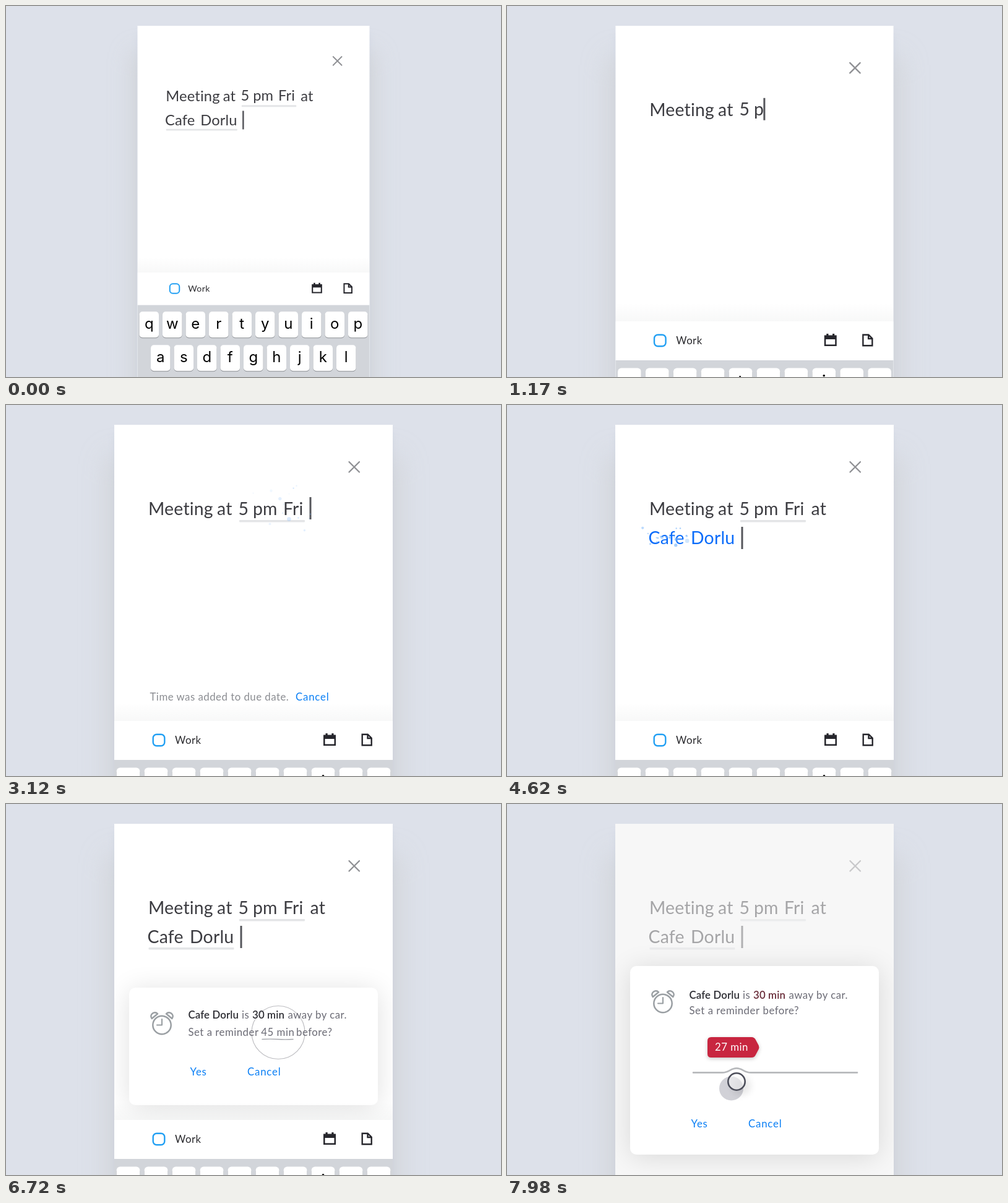
Animation of 800 by 600 pixels, one loop 8 s. Source, as an HTML page:

```html
<!DOCTYPE html>
<html lang="en">
<head>
<meta charset="utf-8">
<title>Smart task input</title>
<style>
  html, body { margin: 0; width: 100%; height: 100%; overflow: hidden; background: #dde1ea; }
  svg { display: block; width: 800px; height: 600px; }
  text { font-family: Lato, "Open Sans", sans-serif; font-size: 16.8px; letter-spacing: .5px; white-space: pre; }
  .big { font-size: 28.4px; letter-spacing: .2px; }
  .key { font-family: Inter, Roboto, sans-serif; font-size: 28.8px; letter-spacing: 0; text-anchor: middle; }
  .strong { font-weight: 600; letter-spacing: .15px; fill: #2d2d33; }
  .soft { fill: #6b6b75; }
  .link { letter-spacing: .8px; fill: #0a7ff5; }
  .line { fill: none; stroke-linecap: round; stroke-linejoin: round; }
</style>
</head>
<body>
<svg viewBox="0 0 800 600">
  <defs>
    <filter id="wide" filterUnits="userSpaceOnUse" x="0" y="0" width="800" height="1000"><feGaussianBlur stdDeviation="22"/></filter>
    <filter id="near" filterUnits="userSpaceOnUse" x="0" y="0" width="800" height="1000"><feGaussianBlur stdDeviation="6"/></filter>
    <filter id="small" x="-40%" y="-60%" width="180%" height="240%"><feDropShadow dx="0" dy="2" stdDeviation="3" flood-color="#000" flood-opacity=".22"/></filter>
    <clipPath id="clip"><rect x="175" y="32" width="450" height="700"/></clipPath>
    <linearGradient id="fade" x1="0" y1="0" x2="0" y2="1">
      <stop offset="0" stop-color="#30403c" stop-opacity="0"/>
      <stop offset="1" stop-color="#30403c" stop-opacity=".035"/>
    </linearGradient>
  </defs>
  <rect width="800" height="600" fill="#dde1ea"/>
  <g id="phone">
    <rect x="163" y="82" width="474" height="800" fill="#cdcfd0" opacity=".68" filter="url(#wide)"/>
    <rect x="175" y="44" width="450" height="800" fill="#c3cbdc" opacity=".4" filter="url(#near)"/>
    <rect x="175" y="32" width="450" height="900" fill="#fff"/>
    <g clip-path="url(#clip)">
      <path class="line" d="M554.5 92l16.5 16.5M571 92l-16.5 16.5" stroke="#8f9094" stroke-width="2.3"/>
      <rect id="rule1" x="377" y="186" width="106" height="3.5" rx="1"/>
      <rect id="rule2" x="230.5" y="232" width="138" height="3.5" rx="1"/>
      <g id="words"></g>
      <rect id="caret" width="3" height="36" fill="#55565b"/>
      <g id="dots" fill="#6fb0fa"></g>
      <g id="toast">
        <text x="232.5" y="478.3" fill="#8a8c91">Time was added to due date.</text>
        <text x="468" y="478.3" class="link">Cancel</text>
      </g>
      <rect id="dim" x="175" y="32" width="450" height="700" fill="#f2f2f2"/>
      <g id="card">
        <rect id="shade" x="199" width="402" rx="10" fill="#000" opacity=".12" filter="url(#wide)"/>
        <rect id="sheet" x="199" width="402" rx="10" fill="#fff"/>
        <g id="clock" class="line" stroke="#9a9fa3" stroke-width="2.5">
          <circle r="14.7"/>
          <path d="M-16.3-10.5C-21-17-12-23.5-7-18.2ZM16.3-10.5C21-17 12-23.5 7-18.2Z"/>
          <path id="hands" stroke-width="2.1"/>
        </g>
        <g id="row1">
          <text x="294.5" class="strong">Cafe Dorlu</text>
          <text x="381" class="soft">is</text>
          <text x="398" class="strong" id="away">30 min</text>
          <text x="455.5" class="soft">away by car.</text>
        </g>
        <g id="row2" class="soft">
          <text x="294.5">Set a reminder</text>
          <text id="before">before?</text>
          <path id="wave" class="line" d="M414 5.8q13-.8 25 0t25 0" stroke="#a4a6ab" stroke-width="1.4"/>
        </g>
        <g id="slider">
          <path id="track" class="line" stroke="#b7b9bc" stroke-width="2.6"/>
          <circle id="touch" r="19.5" fill="#5a5a70"/>
          <circle id="glow" cy="456" r="15" fill="#000" opacity=".09" filter="url(#near)"/>
          <circle id="knob" cy="449" r="13.7" fill="#fff" fill-opacity=".5" stroke="#4c4e5a" stroke-width="2.6"/>
          <path id="bubble" filter="url(#small)"/>
        </g>
        <text id="mins" text-anchor="middle"></text>
        <g id="buttons">
          <text x="297.5" class="link">Yes</text>
          <text x="390" class="link">Cancel</text>
        </g>
        <circle id="dot" cx="440" cy="369.5" r="19" fill="#5a5a70"/>
        <circle id="ring" cx="440" cy="369.5" fill="none" stroke="#5a5a64" stroke-width="1.2"/>
      </g>
      <g id="dock">
        <rect x="175" y="481" width="450" height="30" fill="url(#fade)"/>
        <rect x="175" y="511" width="450" height="63" fill="#fff"/>
        <rect x="237.7" y="532.7" width="18.6" height="18.6" rx="5.8" fill="none" stroke="#23a0f3" stroke-width="2.4"/>
        <text x="273" y="548.3" fill="#2a2a2e">Work</text>
        <path fill="#26262c" fill-rule="evenodd" d="M513 533.5h3.5v-2.5h3.2v2.5h6.600v-2.500h3.200v2.500h3.500v17.500h-20zM515.500 540v8.500h15v-8.500z"/>
        <path d="M575.700 532.700h9l6 6v11.600h-15zM584.500 533v6h6" fill="none" stroke="#26262c" stroke-width="2.400"/>
        <rect x="175" y="574" width="450" height="200" fill="#d2d5da"/>
        <g id="keys"></g>
      </g>
    </g>
  </g>
</svg>
<script>
const LOOP = 8000;
const $ = id => document.getElementById(id);
const set = (id, attrs) => {
  const node = typeof id === 'string' ? $(id) : id;
  for (const k in attrs) node.setAttribute(k, attrs[k]);
};
const make = (parent, tag, attrs, text = '') => {
  const node = document.createElementNS('http://www.w3.org/2000/svg', tag);
  set(node, attrs);
  node.textContent = text;
  return $(parent).appendChild(node);
};
const clamp = v => Math.max(0, Math.min(1, v));
const lerp = (a, b, p) => a + (b - a) * p;
const ramp = (t, a, b) => clamp((t - a) / (b - a));
const inOut = p => p < .5 ? 4 * p ** 3 : 1 - 4 * (1 - p) ** 3;
const out = p => 1 - (1 - p) ** 3;
const ease = (t, a, b) => inOut(ramp(t, a, b));
const shift = (x, y) => `translate(${x} ${y})`;
const mix = (a, b, p) => `rgb(${a.map((v, i) => Math.round(lerp(v, b[i], p)))})`;
const rand = n => { const v = Math.sin(n * 12.9898) * 43758.5453; return v - Math.floor(v); };

const INK = [60, 60, 65], BLUE = [10, 108, 250], RULE = [228, 229, 231], TINT = [196, 217, 250];
const SLATE = [80, 82, 95], RED = [200, 40, 63], SOFT = [107, 107, 117], DARK = [45, 45, 51];
const WHITE = [255, 255, 255];

// text, x, baseline, caret x after the space, highlight group
const words = [
  ['Meeting', 230, 178.4, 340, 0], ['at', 341, 178.4, 374, 0],
  ['5', 375.5, 177.6, 398, 1], ['pm', 399, 177.6, 447, 1], ['Fri', 448, 177.6, 492, 1],
  ['at', 491.5, 178.4, 231, 0],
  ['Cafe', 228.5, 225.4, 297, 2], ['Dorlu', 297, 225.4, 380, 2]
].map(([text, x, y, next, group]) =>
  ({ text, x, y, next, group, node: make('words', 'text', { class: 'big', x, y }) }));

['qwertyuiop', 'asdfghjkl'].forEach((row, r) => [...row].forEach((letter, i) => {
  const x = (r ? 200.8 : 178.6) + i * 45, y = 586.6 + r * 64.8;
  const box = { x, width: 37.8, height: 50.4, rx: 6 };
  make('keys', 'rect', { ...box, y: y + 1.3, fill: '#8b8e93' });
  make('keys', 'rect', { ...box, y, fill: '#fff' });
  make('keys', 'text', { class: 'key', x: x + 18.9, y: y + 33, fill: '#000' }, letter);
}));

const bursts = [
  { start: 2190, from: 376, to: 483, y: 167, life: 300, extra: 600 },
  { start: 4320, from: 229, to: 369, y: 213, life: 400, extra: 850 }
];
const COUNT = 42;
const dots = bursts.flatMap((b, k) => Array.from({ length: COUNT }, (_, i) => {
  const s = k * 500 + i * 7 + 1, f = i / COUNT;
  const angle = rand(s) * Math.PI * 2;
  return {
    node: make('dots', 'circle', {}),
    birth: b.start + f * 560, life: b.life + rand(s + 1) * b.extra,
    x: lerp(b.from, b.to, f), y: b.y + (rand(s + 2) - .7) * 18,
    dx: Math.cos(angle) * (8 + 24 * rand(s + 3)), dy: Math.sin(angle) * (10 + 30 * rand(s + 4)),
    r: 1.1 + 2.3 * rand(s + 5) ** 4
  };
}));

function typed(t) {
  if (t < 30) return 34;
  if (t < 330) return 0;
  if (t < 3270) return Math.min(20, 1 + Math.floor((t - 330) / 63));
  return Math.min(34, 21 + Math.floor((t - 3270) / 60));
}

function drawText(t) {
  const glow = [0,
    ramp(t, 2190, 2370) * (1 - ramp(t, 2560, 2970)),
    ramp(t, 4320, 4500) * (1 - ramp(t, 5000, 5800))];
  let left = typed(t), x = 230.5, line = 149;
  for (const w of words) {
    const shown = w.text.slice(0, Math.max(0, left));
    if (w.node.textContent !== shown) w.node.textContent = shown;
    set(w.node, { fill: mix(INK, BLUE, glow[w.group]) });
    if (left > 0) {
      const done = left > w.text.length;
      x = done ? w.next : w.x + w.node.getComputedTextLength() + .8;
      line = w.y > 200 || done && w.next < w.x ? 197 : 149;
    }
    left -= w.text.length + 1;
  }
  set('caret', { x: x - 1.5, y: line });
  set('rule1', { opacity: t < 30 ? 1 : ramp(t, 2450, 2750), fill: mix(RULE, TINT, glow[1]) });
  set('rule2', { opacity: t < 30 ? 1 : ramp(t, 4950, 5300), fill: mix(RULE, TINT, glow[2]) });
}

function drawDots(t) {
  for (const d of dots) {
    const u = (t - d.birth) / d.life;
    const live = u > 0 && u < 1;
    set(d.node, { opacity: live ? .75 * (1 - u) * clamp(u * 8) : 0 });
    if (live) set(d.node, { cx: d.x + d.dx * out(u), cy: d.y + d.dy * out(u), r: d.r });
  }
}

function drawSlider(t, open, top) {
  const drag = ramp(t, 7630, 7980) ** 1.5;
  const x = lerp(420, 371, drag);
  const l = x - 47, r = x + 29, tip = 8 * ramp(t, 7700, 7920), red = ramp(t, 7800, 7950);
  set('slider', { transform: shift(0, top - 262), opacity: ramp(t, 6950, 7350) });
  set('track', { d: `M301 434.4H${x - 23}C${x - 12} 434.4 ${x - 10} 427.4 ${x} 427.4S${x + 12} 434.4 ${x + 23} 434.4H566` });
  set('knob', { cx: x });
  set('glow', { cx: x + 8 });
  set('touch', { cx: x - 8.5 * drag, cy: lerp(452, 460, drag), opacity: .28 * ramp(t, 7590, 7690) });
  set('bubble', {
    fill: mix(SLATE, RED, red),
    d: `M${l + 6} 377H${r - 5}Q${r} 377 ${r + tip * .25} 381.5L${r + tip * .85} 390.5` +
       `Q${r + tip} 393.5 ${r + tip * .85} 396.5L${r + tip * .25} 405.5Q${r} 410 ${r - 5} 410` +
       `H${l + 6}Q${l} 410 ${l} 404V383Q${l} 377 ${l + 6} 377Z`
  });
  $('mins').textContent = Math.round((x - 300) / 2.67) + ' min';
  set('mins', {
    x: lerp(439.3, x - 8, open), y: lerp(top + 77.7, top + 137.4, open),
    fill: mix(SOFT, WHITE, open)
  });
  set('away', { style: `fill:${mix(DARK, RED, .38 * ramp(t, 7870, 7980))}` });
}

function drawCard(t) {
  const show = ease(t, 5130, 5580), open = ease(t, 6750, 7400);
  const top = lerp(297 + 39 * (1 - show), 262, open);
  const height = lerp(190, 305, open);
  set('card', { opacity: show });
  set('shade', { y: top + 4, height });
  set('sheet', { y: top, height });
  set('clock', { transform: shift(252, top + 60.5) });
  set('row1', { transform: shift(0, top + lerp(50, 52.5, open)) });
  set('row2', { transform: shift(0, top + 77.7) });
  set('before', { x: lerp(469, 413.5, open) });
  set('wave', { opacity: 1 - ramp(t, 6750, 6900) });
  set('buttons', { transform: shift(0, top + lerp(141.5, 260.5, open)) });

  const turn = ease(t, 5330, 6050);
  const hand = (to, len) => {
    const a = lerp(225, to, turn) * Math.PI / 180;
    return `${len * Math.sin(a)} ${-len * Math.cos(a)}`;
  };
  set('hands', { d: `M${hand(360, 9.5)}L0 0L${hand(270, 8)}`, opacity: lerp(.45, 1, turn) });

  drawSlider(t, open, top);
  set('dot', { opacity: .28 * ramp(t, 6280, 6380) * (1 - ramp(t, 6480, 6650)) });
  set('ring', {
    r: lerp(19, 43, out(ramp(t, 6400, 6720))),
    opacity: .4 * ramp(t, 6400, 6460) * (1 - ramp(t, 6720, 6840))
  });
  set('dim', { opacity: .58 * open });
  set('dock', { transform: shift(0, 125 * open) });
}

function draw(t) {
  const zoom = lerp(1 / 1.2, 1, ease(t, 330, 1310));
  set('phone', { transform: `translate(400 32) scale(${zoom}) translate(-400 -32)` });
  drawText(t);
  drawDots(t);
  const rise = out(ramp(t, 2250, 2750)), leave = ramp(t, 4320, 4560);
  set('toast', { transform: shift(0, 14 * (1 - rise) + 18 * leave ** 2), opacity: rise * (1 - leave) });
  drawCard(t);
}

const begin = performance.now();
function frame() {
  draw((performance.now() - begin) % LOOP);
  requestAnimationFrame(frame);
}
frame();
</script>
</body>
</html>
```
